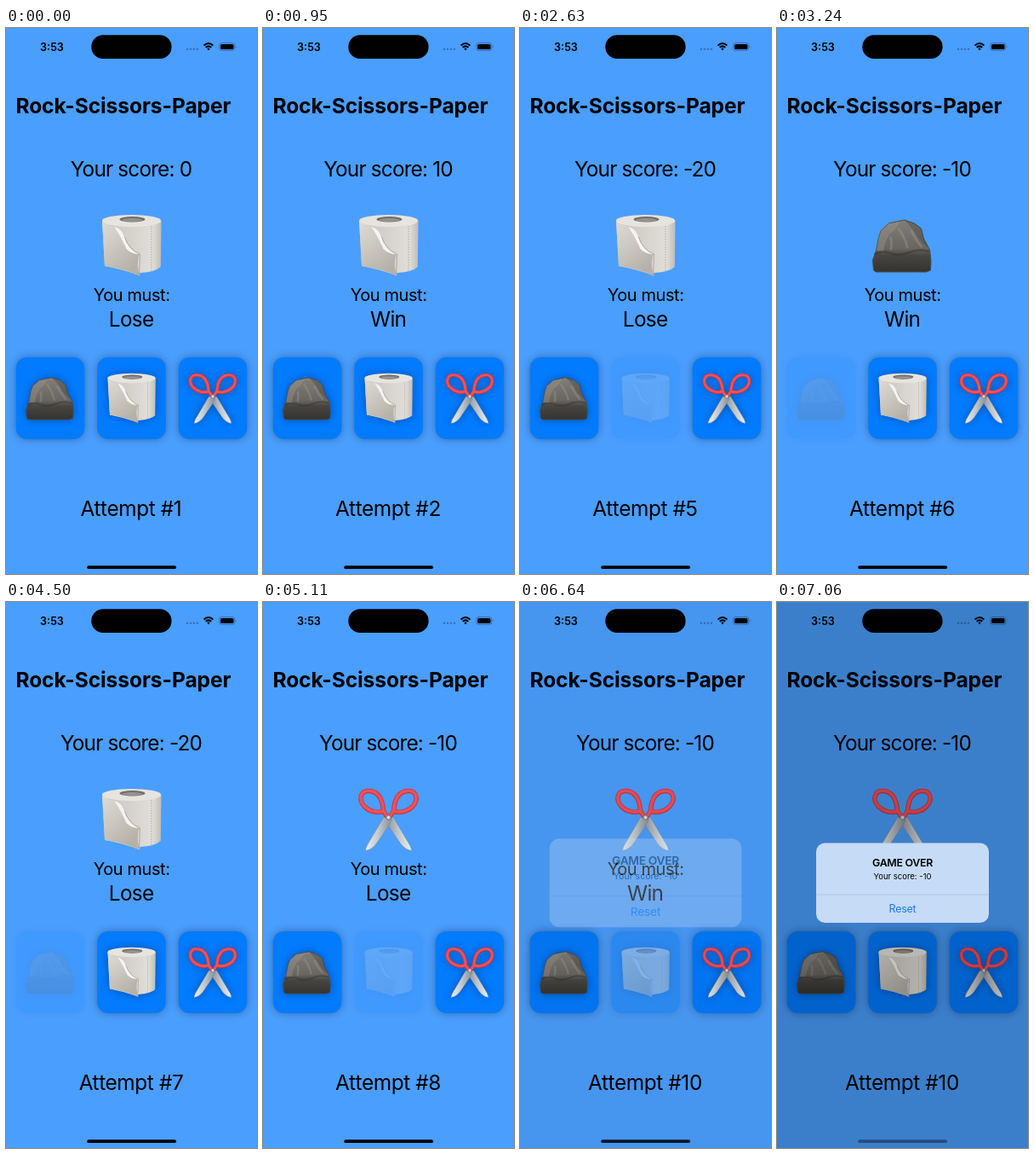
Write an HTML page that moves like this. It is 295 px wide and 640 px high and loops after 8 s.

```html
<!DOCTYPE html>
<html lang="en">
<head>
<meta charset="utf-8">
<title>Rock-Scissors-Paper</title>
<style>
  html, body { margin: 0; width: 100%; height: 100%; overflow: hidden; background: #4a9efe; }
  svg { display: block; width: 295px; height: 640px; }
  text { font-family: Inter, "Liberation Sans", sans-serif; text-anchor: middle; }
  .big { font-size: 24.4px; letter-spacing: -.7px; }
  .mid { font-size: 20px; letter-spacing: -.43px; }
  .title { font-size: 24.6px; font-weight: 700; letter-spacing: -.1px; text-anchor: start; }
  #score { letter-spacing: -.85px; }
  #attempt { letter-spacing: -.4px; }
  .shade { filter: drop-shadow(0 0 5px rgba(0, 0, 0, .33)); }
</style>
</head>
<body>
<svg viewBox="0 0 295 640">
  <defs>
    <linearGradient id="roll">
      <stop offset="0" stop-color="#c9c6bf"/><stop offset=".5" stop-color="#d6d3cc"/>
      <stop offset=".85" stop-color="#e0ded8"/><stop offset="1" stop-color="#c0bdb6"/>
    </linearGradient>
    <linearGradient id="sheet" x2=".55" y2="1">
      <stop offset="0" stop-color="#dedbd5"/><stop offset=".4" stop-color="#cfccc5"/>
      <stop offset="1" stop-color="#b5b1a8"/>
    </linearGradient>
    <linearGradient id="stone" x2="0" y2="1">
      <stop offset="0" stop-color="#827f78"/><stop offset=".55" stop-color="#686560"/>
      <stop offset=".68" stop-color="#474541"/><stop offset="1" stop-color="#353330"/>
    </linearGradient>
    <linearGradient id="steel">
      <stop offset="0" stop-color="#eceff2"/><stop offset=".5" stop-color="#c0c6cd"/>
      <stop offset="1" stop-color="#858d96"/>
    </linearGradient>

    <g id="paper">
      <path d="M-34.5-29L-31.5 24Q-10 28 9 35L10 32Q28 31 34.3 25L35-29Z" fill="url(#roll)"/>
      <ellipse cy="-29" rx="34.7" ry="7" fill="#e6e4de"/>
      <ellipse cx="1" cy="-30.8" rx="15" ry="3.2" fill="#716e69"/>
      <ellipse cx="1" cy="-30" rx="12" ry="1.9" fill="#98948d"/>
      <path d="M-34.5-29Q-29-23.5-20-22Q-11-19-9-11Q-4 5 9 10Q5 24 10 36Q-8 27-31.5 24Z" fill="url(#sheet)"/>
      <path d="M-20-22Q-11-19-9-11Q-4 5 9 10Q0 10-6 4Q-12-10-20-22Z" fill="#f6f4f1"/>
      <path d="M-8-10Q-3 5 10 10L9 33" fill="none" stroke="#8f8b83" stroke-width="1" opacity=".6"/>
      <path d="M23.5-23V30" stroke="#a29e96" stroke-width=".8" stroke-dasharray="1.6 1.4"/>
    </g>

    <g id="rock">
      <path d="M-34 29L-35 17L-31 6L-28-10L-25-18L-16-26L2-30L14-26L22-20L25-8L32 5L33.5 18L33 29L28 31H-31Z" fill="url(#stone)" stroke="#4c4a46" stroke-width="1" stroke-linejoin="round"/>
      <path d="M-31 6L-28-10L-25-18L-16-26L-3-28Q-8-18-15-14Q-22-3-22 7Z" fill="#a09c93" opacity=".35"/>
      <path d="M2-30L14-26L22-20L25-8L30 2Q20-5 14-16Q8-25 2-30Z" fill="#3e3c39" opacity=".35"/>
      <path d="M-5-20Q3-10 6 3M10-18Q15-7 23 2M-14-10Q-12-2-14 5" fill="none" stroke="#b5b1a7" stroke-width="3" opacity=".25"/>
      <path d="M-33 10Q-24 5-14 9T8 8T31 7" fill="none" stroke="#2d2b29" stroke-width="2.5" opacity=".4"/>
    </g>

    <path id="blade" d="M-6-2L1-5L4 0L-1 9L-14 28Q-19 35-27 36.5Q-27 34-25 30Z" fill="url(#steel)" stroke="#7c848d" stroke-width=".5"/>
    <path id="ring" d="M-2-4L-6-10C-12-7-22-9-28-15C-36-23-33-34-23-33.5C-12-33-7-24-6-10" fill="none" stroke-linecap="round" stroke-linejoin="round"/>
    <g id="grip">
      <use href="#ring" stroke="#c9333d" stroke-width="5.4"/>
      <use href="#ring" y="-.3" stroke="#f0505a" stroke-width="3.6"/>
    </g>
    <g id="scissors">
      <use href="#blade" transform="scale(-1 1)"/>
      <use href="#blade"/>
      <use href="#grip"/>
      <use href="#grip" transform="scale(-1 1)"/>
      <circle cy="-2.5" r="2.6" fill="#d6d9dd" stroke="#666d76" stroke-width=".9"/>
    </g>
  </defs>

  <rect width="295" height="640" fill="#4a9efe"/>
  <text class="title" x="11.4" y="100">Rock-Scissors-Paper</text>
  <text class="big" id="score" x="147" y="174"></text>
  <use id="hand" x="147.5" y="255"/>
  <text class="mid" x="147.6" y="320">You must:</text>
  <text class="big" id="goal" x="147.2" y="350"></text>
  <g id="keys"></g>
  <text class="big" id="attempt" x="147" y="572"></text>

  <rect id="dim" width="295" height="640"/>

  <text x="54" y="26.5" font-size="12.6" font-weight="600">3:53</text>
  <rect x="100.3" y="8.3" width="94.3" height="27.7" rx="13.85"/>
  <g opacity=".28">
    <circle cx="213" cy="24.8" r="1.2"/><circle cx="217" cy="24.8" r="1.2"/>
    <circle cx="221" cy="24.8" r="1.2"/><circle cx="225" cy="24.8" r="1.2"/>
  </g>
  <g fill="none" stroke="#000" stroke-width="2">
    <path d="M232.6 20.4Q238 15.6 243.4 20.4M234.7 22.8Q238 20 241.3 22.8"/>
    <path d="M236.3 24L238 26.4L239.7 24Q238 22.8 236.3 24Z" fill="#000" stroke="none"/>
  </g>
  <rect x="250.8" y="17.6" width="18" height="8.8" rx="2.8" fill="none" stroke="#000" stroke-opacity=".38" stroke-width=".8"/>
  <rect x="252.1" y="18.9" width="15.4" height="6.2" rx="1.7"/>
  <path d="M269.9 20.6Q271.3 22 269.9 23.4Z" opacity=".4"/>
  <rect id="home" x="95.3" y="630.3" width="104.7" height="3.8" rx="1.9"/>

  <g id="alert">
    <rect x="46" y="282.5" width="203" height="93.5" rx="10.5" fill="#c6dbf5"/>
    <path d="M46 343H249" stroke="#a3bddb" stroke-width=".7"/>
    <text x="147.5" y="310" font-size="12.4" font-weight="600" letter-spacing="-.3">GAME OVER</text>
    <text x="147.5" y="325" font-size="9.5">Your score: -10</text>
    <text x="147.5" y="364" font-size="12.4" letter-spacing="-.2" fill="#1279e8">Reset</text>
  </g>
</svg>
<script>
const LOOP = 8000;
const $ = id => document.getElementById(id);
const NAMES = ["rock", "paper", "scissors"];

// start, fade length, pressed key, new hand, goal, score
const ROUNDS = [
  [0, 0, "", "paper", "Lose", 0],
  [500, 450, "rock", "paper", "Win", 10],
  [1330, 440, "paper", "rock", "Win", 0],
  [1990, 440, "scissors", "scissors", "Win", -10],
  [2630, 470, "paper", "paper", "Lose", -20],
  [3240, 450, "rock", "rock", "Win", -10],
  [4500, 430, "rock", "paper", "Lose", -20],
  [5110, 420, "paper", "scissors", "Lose", -10],
  [5670, 440, "scissors", "paper", "Win", 0],
  [6530, 530, "paper", "scissors", "Win", -10]
];
const KEY_FADE = [.13, .38, .66, .88, 1, 1];
const ALERT_FADE = [0, .3, .7, .9, .98, 1];

$("keys").innerHTML = NAMES.map((name, i) => `
  <g id="key-${name}" class="shade" transform="translate(${52 + i * 95.5} 434)">
    <rect x="-40.3" y="-48" width="80.6" height="96" rx="13" fill="#027bff"/>
    <g class="shade"><use href="#${name}" transform="scale(.81)"/></g>
  </g>`).join("");

function draw(t) {
  const n = ROUNDS.findLastIndex(r => t >= r[0]);
  const [start, length, pressed, hand, goal, score] = ROUNDS[n];
  const last = n === ROUNDS.length - 1;
  const steps = last ? 5 : 4;
  const step = length ? Math.min(steps, Math.floor((t - start) / length * steps + .001)) : steps;

  $("score").textContent = "Your score: " + score;
  $("goal").textContent = goal;
  $("attempt").textContent = "Attempt #" + (n + 1);
  $("hand").setAttribute("href", "#" + hand);
  for (const name of NAMES)
    $("key-" + name).style.opacity = name === pressed ? KEY_FADE[step] : 1;

  const shown = last ? ALERT_FADE[step] : 0;
  const zoom = 1 + .16 * (1 - shown);
  $("dim").style.opacity = .2 * shown;
  $("alert").style.opacity = shown;
  $("alert").setAttribute("transform",
    `translate(147.5 329) scale(${zoom}) translate(-147.5 -329)`);
  $("home").setAttribute("fill", `rgb(${[38, 78, 122].map(c => c * shown)})`);
}

const begin = performance.now();
function tick() {
  draw((performance.now() - begin) % LOOP);
  requestAnimationFrame(tick);
}
tick();
</script>
</body>
</html>
```
